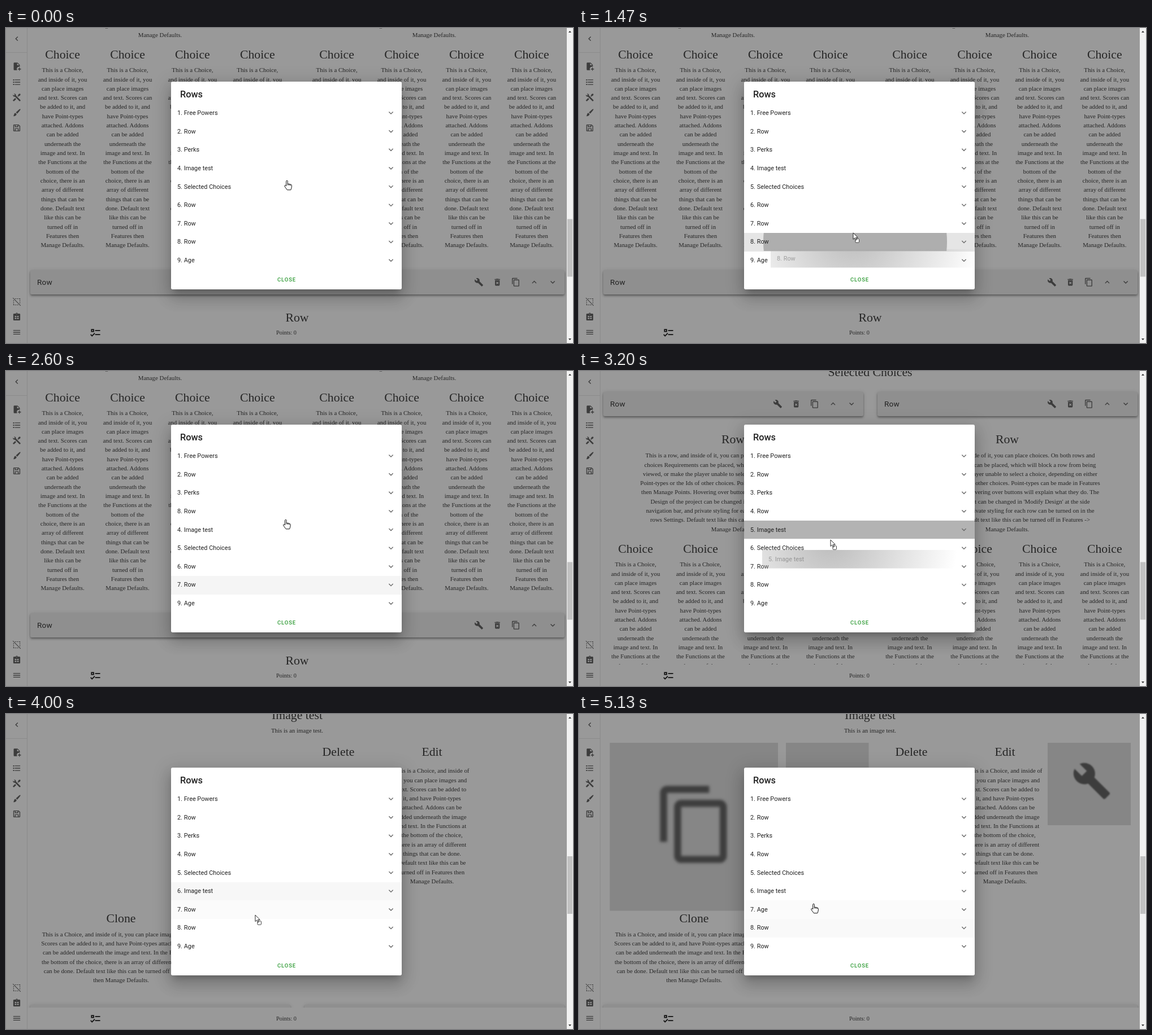
An HTML page that plays this animation: 1003x558 px, repeating every 6.19 s.

```html
<!DOCTYPE html>
<html lang="en">
<head>
<meta charset="utf-8">
<title>Reordering rows</title>
<style>
html, body { margin: 0; width: 100%; height: 100%; overflow: hidden; background: #999; }
svg { display: block; }
text { white-space: pre; }
foreignObject { overflow: visible; }
foreignObject div { height: 100%; border-radius: 2.7px; }
.serif { font-family: "Liberation Serif", serif; fill: #262626; text-anchor: middle; }
.sans { font-family: Roboto, sans-serif; fill: #212121; }
.bar { background: #8f8f8f; box-shadow: 0 1.5px 3px -.7px #0004, 0 3px 3.5px #0003, 0 .7px 7px #0002; }
.modal { background: #fff; box-shadow: 0 7.5px 10px -4.8px #0003, 0 16px 26px 2px #0002, 0 6px 31px 5.4px #0002; }
</style>
</head>
<body>
<svg id="stage" width="1003" height="558" viewBox="0 0 1003 558"></svg>
<script>
const LOOP = 6190, ROW_TOP = 134.4, ROW_H = 32.64;

const icons = {
  left: 'M15.41 16.58L10.83 12l4.58-4.59L14 6l-6 6 6 6z',
  down: 'M7.41 8.58L12 13.17l4.59-4.59L18 10l-6 6-6-6z',
  up: 'M7.41 15.41L12 10.83l4.59 4.58L18 14l-6-6-6 6z',
  wrench: 'M22.7 19L13.6 9.9C14.5 7.6 14 4.9 12.1 3 10.1 1 7.1.6 4.7 1.7L9 6 6 9 1.6 4.7C.4 7.1.9 10.1 2.9 12.1 4.8 14 7.5 14.5 9.8 13.6l9.1 9.1c.4.4 1 .4 1.4 0l2.3-2.3c.5-.4.5-1.1.1-1.4z',
  copy: 'M19 21H8V7h11m0-2H8a2 2 0 0 0-2 2v14a2 2 0 0 0 2 2h11a2 2 0 0 0 2-2V7a2 2 0 0 0-2-2M16 1H4a2 2 0 0 0-2 2v14h2V3h12z',
  trash: 'M6 19a2 2 0 0 0 2 2h8a2 2 0 0 0 2-2V7H6zM8.46 11.88l1.41-1.41L12 12.59l2.12-2.12 1.41 1.41L13.41 14l2.12 2.12-1.41 1.41L12 15.41l-2.12 2.12-1.41-1.41L10.59 14zM15.5 4l-1-1h-5l-1 1H5v2h14V4z',
  filePlus: 'M14 2H6a2 2 0 0 0-2 2v16a2 2 0 0 0 2 2h7a6 6 0 0 1 7-9V8zM13 9V3.5L18.5 9zM18 15v3h-3v2h3v3h2v-3h3v-2h-3v-3z',
  list: 'M7 5h14v2H7zM7 11h14v2H7zM7 17h14v2H7zM2.5 4.5h3v3h-3zM2.5 10.5h3v3h-3zM2.5 16.5h3v3h-3z',
  tools: 'M21.7 20.3l-1.4 1.4a1 1 0 0 1-1.4 0L7 9.85A4 4 0 0 1 2.22 4.7l2.54 2.54 2.48-2.48L4.7 2.22A4 4 0 0 1 9.85 7L21.7 18.9a1 1 0 0 1 0 1.4M2.3 18.9a1 1 0 0 0 0 1.4l1.4 1.4a1 1 0 0 0 1.4 0l5.5-5.45-2.83-2.83M20 2l-4 2v2l-2.17 2.17 2 2L18 8h2l2-4z',
  brush: 'M21.4 2.7c1 1.1-.5 3.2-8.2 11.8l-3.3-3.2C18.2 3.4 20.4 1.7 21.4 2.7zM8.6 12.6l3 3C10.8 20 7 21.6 2.6 21c2.2-1.4 2-3 2.5-5s1.7-3.2 3.5-3.4z',
  save: 'M17 3H5a2 2 0 0 0-2 2v14a2 2 0 0 0 2 2h14a2 2 0 0 0 2-2V7zM5 5h2v5h9V5h.2L19 7.8V19h-2v-6H7v6H5zM9 5h5v3H9zM9 15h6v4H9z',
  selectOff: 'M4 3h2v1.5H4zM8 3h3v1.5H8zM13 3h3v1.5h-3zM18 3h3v3h-1.5V4.5H18zM19.5 8H21v3h-1.5zM19.5 13H21v3h-1.5zM3 8h1.5v3H3zM3 13h1.5v3H3zM3 18h1.5v1.5H6V21H3zM8 19.5h3V21H8zM13 19.5h3V21h-3zM1.5 2.5l1-1 20 20-1 1z',
  clipboard: 'M19 3h-4.2a3 3 0 0 0-5.6 0H5a2 2 0 0 0-2 2v14a2 2 0 0 0 2 2h14a2 2 0 0 0 2-2V5a2 2 0 0 0-2-2M12 3a1 1 0 1 1 0 2 1 1 0 0 1 0-2M7 9h4v3H7zM13 9h4v3h-4zM7 14h4v3H7zM13 14h4v3h-4z',
  menu: 'M3 6h18v2H3zM3 11h18v2H3zM3 16h18v2H3z',
  checks: 'M3 5h6v6H3zM5 7v2h2V7zM11 7h10v2H11zM11 15h10v2H11zM5 20l-3.5-3.5 1.41-1.41L5 17.17l4.59-4.58L11 14z'
};

const icon = (name, x, y, size = 16.32, fill = '#3c3c3c', extra = '') =>
  `<path d="${icons[name]}" fill="${fill}" fill-rule="evenodd" ${extra} transform="translate(${x - size / 2} ${y - size / 2}) scale(${size / 24})"/>`;
const rect = (x, y, w, h, extra) => `<rect x="${x}" y="${y}" width="${w}" height="${h}" ${extra}/>`;
const box = (x, y, w, h, name) => `<foreignObject x="${x}" y="${y}" width="${w}" height="${h}"><div class="${name}"></div></foreignObject>`;
const serif = (s, x, y, size) => `<text class="serif" x="${x}" y="${Math.round(y + size * .33)}" font-size="${size}">${s}</text>`;
const sans = (s, x, y, size, extra = '') => `<text class="sans" x="${x}" y="${Math.round(y + size * .36)}" font-size="${size}" ${extra}>${s}</text>`;
const heading = (s, x, y) => serif(s, x, y, 21.76);
const lines = (s, x, y) => s.split('|').map((line, i) => serif(line, x, y + i * 16.32, 10.88)).join('');

const rowText = "This is a row, and inside of it, you can place choices. On both rows and|choices Requirements can be placed, which will block a row from being|viewed, or make the player unable to select a choice, depending on either|Point-types or the Ids of other choices. Point-types can be made in Features|then Manage Points. Hovering over buttons will explain what they do. The|Design of the project can be changed in 'Modify Design' at the side|navigation bar, and private styling for each row can be turned on in the|rows Settings. Default text like this can be turned off in Features -&gt;|Manage Defaults.";
const narrowText = 'This is a Choice,|and inside of it, you|can place images|and text. Scores can|be added to it, and|have Point-types|attached. Addons|can be added|underneath the|image and text. In|the Functions at the|bottom of the|choice, there is an|array of different|things that can be|done. Default text|like this can be|turned off in|Features then|Manage Defaults.';
const editText = 'This is a Choice, and inside of|it, you can place images and|text. Scores can be added to|it, and have Point-types|attached. Addons can be|added underneath the image|and text. In the Functions at|the bottom of the choice,|there is an array of different|things that can be done.|Default text like this can be|turned off in Features then|Manage Defaults.';
const cloneText = 'This is a Choice, and inside of it, you can place images and text.|Scores can be added to it, and have Point-types attached. Addons|can be added underneath the image and text. In the Functions at|the bottom of the choice, there is an array of different things that|can be done. Default text like this can be turned off in Features|then Manage Defaults.';

const panel = (x, y, w) => box(x, y, w, 43, 'bar');
const rowBar = (x, y, w) => panel(x, y, w) + sans('Row', x + 12, y + 21.3, 13.6, 'letter-spacing=".17"') +
  ['wrench', 'trash', 'copy', 'up', 'down'].map((n, i) => icon(n, x + w - 151 + i * 32.65, y + 21.3)).join('');

// Choices page, laid out for its lower scroll position
const choicesPage = heading('Selected Choices', 515, -266) +
  [[43, 272.5], [528, 757.5]].map(([x, mid]) => rowBar(x, -231, 459.5) + heading('Row', mid, -147) +
    lines(rowText, mid, -118.4) +
    [0, 1, 2, 3].map(i => {
      const cx = mid - 172.4 + i * 114.9;
      return heading('Choice', cx, 47) + lines(narrowText, cx, 74.6);
    }).join('')).join('') +
  rowBar(43, 429, 944.5) + heading('Row', 515, 513);

const picture = (x, y, w, h) => rect(x, y, w, h, 'fill="#868686"');
const imagePage = heading('Image test', 515, 2) + lines('This is an image test.', 515, 29.5) +
  heading('Delete', 588, 67) + heading('Edit', 753.5, 67) + lines(editText, 753.5, 100.6) +
  heading('Clone', 203.5, 362) + lines(cloneText, 203.5, 390) +
  `<g id="images">${picture(54.5, 51, 297.5, 297.5)}${picture(366, 51, 146.5, 146)}${picture(829, 51, 147, 146)}` +
  icon('copy', 205.5, 195.5, 149, '#3d3d3d', 'style="filter:blur(.45px)"') +
  icon('wrench', 907, 118.5, 70, '#3d3d3d', 'style="filter:blur(.35px)"') + '</g>' +
  `<g id="split">${panel(43, 515, 460)}${panel(528, 515, 460)}</g><g id="joined">${panel(43, 515, 945)}</g>`;

const sideIcons = { left: 19, filePlus: 68, list: 96, tools: 123, brush: 150, save: 177, selectOff: 485, clipboard: 512, menu: 539 };

const rowY = i => Math.round(ROW_TOP + i * ROW_H);
const rowMid = i => ROW_TOP + i * ROW_H + 15.7;
const nine = [...Array(9).keys()];

document.getElementById('stage').innerHTML = `
<defs>
  <clipPath id="pageClip">${rect(38, 0, 954, 520, '')}</clipPath>
  <clipPath id="rippleClip"><rect id="rippleBox" x="292" width="408" height="32"/></clipPath>
  <radialGradient id="fade" gradientUnits="userSpaceOnUse" r="225">
    <stop offset="0" stop-color="#aaa" stop-opacity=".8"/>
    <stop offset="1" stop-color="#aaa" stop-opacity="0"/>
  </radialGradient>
</defs>
${rect(0, 0, 1003, 558, 'fill="#999"')}
<g clip-path="url(#pageClip)"><g id="choices">${choicesPage}</g><g id="imagePage">${imagePage}</g></g>
${rect(0, 0, 38, 558, 'fill="#999"')}${rect(37, 0, 1, 558, 'fill="#8b8b8b"')}${rect(0, 43, 38, 1, 'fill="#8b8b8b"')}
${rect(38, 520, 954, 38, 'fill="#999"')}
${Object.entries(sideIcons).map(([n, y]) => icon(n, 19, y)).join('')}
${icon('checks', 158.5, 539.5, 21.5, '#111')}${serif('Points: 0', 496, 539.5, 10.2)}
${rect(992, 0, 11, 558, 'fill="#f1f1f1"')}<rect id="thumb" x="993" width="9" height="102" fill="#c1c1c1"/>
<path d="M995 8l2.5-3 2.5 3zM995 550l2.5 3 2.5-3z" fill="#333"/>
${box(292, 95, 408, 368, 'modal')}
${sans('Rows', 308, 117, 16.32, 'font-weight="500"')}
${nine.map(i => `<rect class="tint" x="292" y="${rowY(i)}" width="408" height="${rowY(i + 1) - rowY(i)}"/>`).join('')}
<g clip-path="url(#rippleClip)"><circle id="ripple" cx="488.5"/></g>
${nine.map(i => sans('', 303, rowMid(i), 10.88, 'data-row') + icon('down', 681, rowMid(i) + .3, 16.32, '#666')).join('')}
${sans('CLOSE', 480, 446, 9.52, 'font-weight="500" letter-spacing=".85" style="fill:#2e9a34"')}
<g id="ghost"><rect width="408" height="32.6" fill="url(#fade)"/>${sans('', 11, 16.3, 10.88, 'id="ghostText" opacity=".35"')}</g>
<g id="cursor" stroke-linejoin="round">
  <g id="hand"><path d="M-1.3 1.6a1.3 1.3 0 0 1 2.6 0V6l5 1q2.2.5 2.2 2.6l-.5 3.6-1.2 3.6H.4L-3.8 11q-1-1.7.2-2.3t2.3 1.3z" fill="#fff" stroke="#111"/><path d="M1.3 6v2.6M3.8 6.6v2.4M6.2 7.1v2.3" stroke="#111" fill="none"/></g>
  <g id="arrow"><rect x="4" y="10.7" width="6.5" height="6.5" rx="1" fill="#fff" stroke="#444"/><path d="M0 0v11.5L2.7 9l1.8 4 1.8-.8-1.7-3.8h3.7z" fill="#fff" stroke="#111" stroke-width=".9"/></g>
</g>`;

// Pointer tip: time, x, y
const path = [
  [0, 497, 270], [330, 497, 270], [930, 472, 376], [1000, 471, 379], [1200, 471, 379], [1470, 485, 363],
  [1800, 487, 309], [2200, 487, 256], [2530, 487, 256], [2600, 495, 263], [2870, 430, 282], [3070, 430, 282],
  [3200, 445, 299], [3670, 445, 316], [3730, 442, 350], [3870, 442, 350], [4000, 441, 356], [4470, 403, 398],
  [4600, 401, 400], [4730, 401, 400], [5130, 415, 336], [LOOP, 415, 336]
];
const handTimes = [[0, 1400], [2560, 3130], [4200, 4820], [5110, LOOP]];

// Each phase: list order at its start and the one drag that follows
const phases = [
  { start: 0, names: 'Free Powers,Row,Perks,Image test,Selected Choices,Row,Row,Row,Age', from: 7, ripple: 1341, grab: 1455, drop: 2200, dx: -146, dy: 29 },
  { start: 2670, names: 'Free Powers,Row,Perks,Row,Image test,Selected Choices,Row,Row,Age', from: 4, ripple: 3030, grab: 3140, drop: 3720, dx: -121, dy: 18 },
  { start: 3870, names: 'Free Powers,Row,Perks,Row,Selected Choices,Image test,Row,Row,Age', from: 8, ripple: 4730, grab: 4850, drop: 5110, dx: -88, dy: 24 },
  { start: 5130, names: 'Free Powers,Row,Perks,Row,Selected Choices,Image test,Age,Row,Row' }
];
// Row tints: start, end, row, opacity
const tints = [
  [1330, 1720, 7, .1], [1720, 2670, 7, .04], [3070, 3500, 4, .08], [3870, 4500, 5, .03],
  [3930, LOOP, 6, .015], [4530, LOOP, 7, .025], [4760, 5060, 8, .08]
];

const $ = id => document.getElementById(id);
const set = (el, attrs) => { for (const k in attrs) el.setAttribute(k, attrs[k]); };
const show = (id, on) => { $(id).style.display = on ? '' : 'none'; };
const clamp = (v, lo, hi) => Math.min(hi, Math.max(lo, v));
const within = t => ([a, b]) => t >= a && t < b;
const labels = document.querySelectorAll('[data-row]');
const tintBoxes = document.querySelectorAll('.tint');

function pointer(t) {
  const i = Math.max(1, path.findIndex(p => p[0] > t));
  const [a, b] = [path[i - 1], path[i]], k = (t - a[0]) / (b[0] - a[0]);
  return [a[1] + (b[1] - a[1]) * k, a[2] + (b[2] - a[2]) * k];
}

function drawList(t, x, y) {
  const p = phases.findLast(q => t >= q.start);
  const items = p.names.split(',').map((n, i) => `${i + 1}. ${n}`);
  const dragging = t >= p.grab && t < p.drop;
  show('ghost', dragging);
  if (dragging) {
    $('ghostText').textContent = items[p.from];
    set($('ghost'), { transform: `translate(${x + p.dx} ${y + p.dy})` });
    set($('fade'), { cx: -p.dx, cy: -p.dy });
  }
  if (t >= p.grab + 70) {
    const over = pointer(Math.min(t - 70, p.drop - 50))[1];
    const to = clamp(Math.floor((over - ROW_TOP) / ROW_H), 0, 8);
    items.splice(to, 0, ...items.splice(p.from, 1));
  }
  labels.forEach((el, i) => { el.textContent = items[i]; });

  const age = t - p.ripple;
  show('ripple', age > 0 && age < 460);
  if (age > 0) {
    set($('rippleBox'), { y: rowY(p.from) });
    set($('ripple'), { cy: rowMid(p.from), r: Math.min(age * 1.25, 240), opacity: .24 * clamp((460 - age) / 250, 0, 1) });
  }
}

function draw(t) {
  const [x, y] = pointer(t);
  const images = t >= 3870, hand = handTimes.some(within(t));
  show('choices', !images);
  set($('choices'), { transform: `translate(0 ${t < 2670 ? 0 : 268})` });
  show('imagePage', images);
  show('images', t >= 4270);
  show('split', t < 5130);
  show('joined', t >= 5130);
  set($('thumb'), { y: images ? 252 : 338.5 });
  tintBoxes.forEach((el, i) => {
    const tint = tints.find(s => s[2] === i && within(t)(s));
    set(el, { opacity: tint ? tint[3] : 0 });
  });
  drawList(t, x, y);
  set($('cursor'), { transform: `translate(${x} ${y})` });
  show('hand', hand);
  show('arrow', !hand);
}

const began = performance.now();
function tick() {
  draw((performance.now() - began) % LOOP);
  requestAnimationFrame(tick);
}
tick();
</script>
</body>
</html>
```
